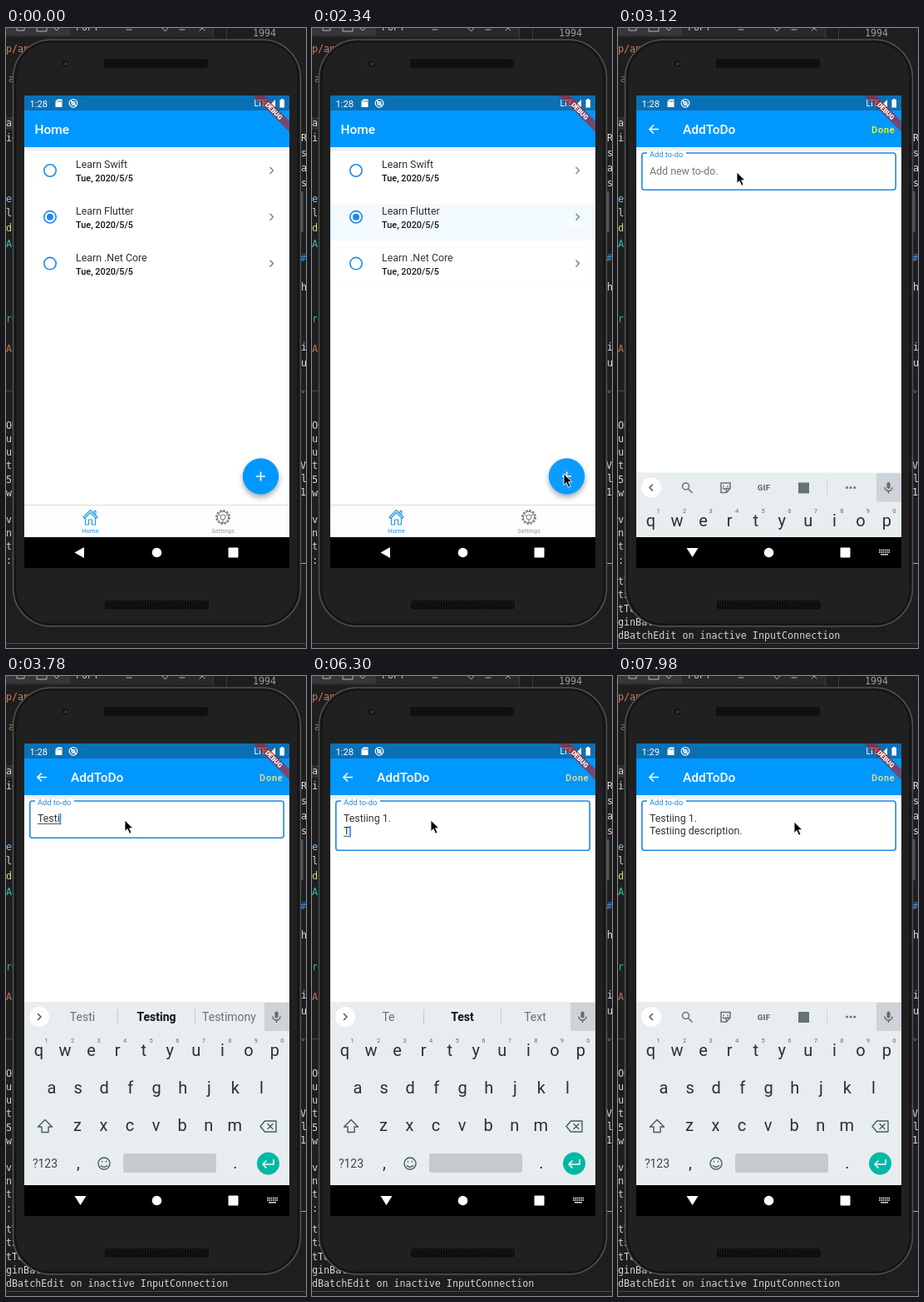
Write an HTML page that moves like this. It is 361 px wide and 744 px high and loops after 8 s.

```html
<!DOCTYPE html>
<html lang="en">
<head>
<meta charset="utf-8">
<title>To-do app</title>
<style>
  html, body { margin: 0; width: 100%; height: 100%; overflow: hidden; background: #1e1e1e; }
  svg { display: block; width: 361px; height: 744px; font-family: Roboto, sans-serif; }
  .mono { font: 11.7px "DejaVu Sans Mono", monospace; white-space: pre; }
  .mid { text-anchor: middle; }
  .line { fill: none; stroke-linecap: round; stroke-linejoin: round; }
  .title { font-size: 15.5px; font-weight: 500; fill: #fff; }
  .body { font-size: 12.4px; fill: #303030; }
  .keys { font-size: 20px; fill: #263238; }
  #cursor, #page, #keyboard, #label, #hint, #gap, #frame { animation: 8s linear infinite; }
  #cursor { animation-name: point; }
  #page { animation-name: enter; }
  #keyboard { animation-name: rise; }
  #label { animation-name: float; }
  #hint, #gap { animation-name: reveal; }
  #frame { animation-name: focus; }

  @keyframes point {
    0%, 2.2% { transform: translate(185px, 750px); }
    9% { transform: translate(184px, 600px); }
    12% { transform: translate(184px, 590px); }
    16.2% { transform: translate(180px, 310px); }
    18.6%, 22.2% { transform: translate(157px, 210px); animation-timing-function: ease-in-out; }
    26.5%, 29.5% { transform: translate(303px, 535px); animation-timing-function: ease-in; }
    33.5% { transform: translate(150px, 240px); animation-timing-function: ease-out; }
    35.2%, 96.6% { transform: translate(143px, 173px); animation-timing-function: ease-in-out; }
    99.5%, 100% { transform: translate(212px, 175px); }
  }
  @keyframes enter {
    0%, 29.2% { opacity: 0; transform: translateY(118px); animation-timing-function: ease-out; }
    31.4%, 100% { opacity: 1; transform: none; }
  }
  @keyframes rise {
    0%, 38.4% { transform: translateY(222px); animation-timing-function: ease-out; }
    41%, 100% { transform: none; }
  }
  @keyframes float {
    0%, 35.6% { transform: translate(38px, 176px) scale(1.33); fill: #777; animation-timing-function: ease-out; }
    37%, 100% { transform: translate(38px, 154.6px); fill: #1e88e5; }
  }
  @keyframes reveal { 0%, 35.8% { opacity: 0; } 37%, 100% { opacity: 1; } }
  @keyframes focus {
    0%, 35.6% { stroke: #999; stroke-width: .8px; }
    37%, 100% { stroke: #1e88e5; stroke-width: 1.6px; }
  }
</style>
</head>
<body>
<svg viewBox="0 0 361 744">
  <defs>
    <clipPath id="screen"><path d="M22 81H341V648H22z"/></clipPath>
    <clipPath id="content"><path d="M22 99H341V572H22z"/></clipPath>
    <clipPath id="app"><path d="M22 99H341V611H22z"/></clipPath>
    <pattern id="mesh" width="3" height="3" patternUnits="userSpaceOnUse">
      <path d="M0 0H3V3H0z" fill="#0b0b0b"/><circle cx="1.5" cy="1.5" r=".8" fill="#242424"/>
    </pattern>
    <filter id="shadow" x="-40%" y="-40%" width="180%" height="190%">
      <feDropShadow dx="0" dy="3.5" stdDeviation="3" flood-opacity=".35"/>
    </filter>
  </defs>

  <path d="M0 0H361V744H0z" fill="#1e1e1e"/>
  <path d="M0 0H249V11H0z" fill="#29292b"/>
  <path d="M0 0H77V9H0z" fill="#37373a"/>
  <path d="M249.5 0V14M265.5 0V14" stroke="#3a3a3a"/>
  <g class="line" stroke="#b5b5b5">
    <path d="M13 0V3H22V0M37 0V4H49V0M58 0L61 3L64 0M145 2H151M188 0L191.500 4L195 0M209 2H215M233 3L236 0L239 3"/>
  </g>
  <path d="M0 107H9V122H0z" fill="#303030"/>
  <path d="M0 435.500H361M0 738.500H361" stroke="#484848"/>
  <path d="M354 642.500H361" stroke="#aaa"/>
  <g id="editor" class="mono"></g>
  <g id="log" class="mono" fill="#d4d4d4"></g>

  <!-- phone body -->
  <path d="M354 196H357.500V245H354z" fill="#555"/>
  <rect x="8.500" y="14" width="346" height="704" rx="46" fill="#1c1c1c" stroke="#525252" stroke-width="1.500"/>
  <rect x="11.500" y="16.500" width="340" height="699" rx="43" fill="#202020" stroke="#121212" stroke-width="1.500"/>
  <rect x="118" y="37" width="125" height="11" rx="3" fill="url(#mesh)"/>
  <rect x="119" y="687" width="125" height="10.500" rx="3" fill="url(#mesh)"/>
  <circle cx="71.500" cy="43" r="5" fill="#151515" stroke="#2b2b2b"/>
  <circle cx="72" cy="43" r="2" fill="#33343a"/>

  <g clip-path="url(#screen)">
    <path d="M22 81H341V648H22z" fill="#fff"/>

    <!-- list page -->
    <path d="M22 143H341V147H22z" fill="#000" opacity=".07"/>
    <path d="M22 99H341V143H22z" fill="#0098ff"/>
    <text class="title" x="34.500" y="127">Home</text>
    <g id="list"></g>
    <circle cx="306.500" cy="538" r="21.700" fill="#0098ff" filter="url(#shadow)"/>
    <path d="M301 538H312M306.500 532.500V543.500" stroke="#fff" stroke-width="1.600"/>

    <!-- entry page -->
    <g clip-path="url(#content)">
      <g id="page">
        <path d="M22 99H341V572H22z" fill="#fff"/>
        <path d="M22 143H341V147H22z" fill="#000" opacity=".07"/>
        <path d="M22 99H341V143H22z" fill="#0098ff"/>
        <path d="M49 121.500H38M43 116.500L38 121.500L43 126.500" fill="none" stroke="#fff" stroke-width="1.600"/>
        <text class="title" x="78" y="127">AddToDo</text>
        <text id="done" x="305" y="125.500" font-size="10.900" font-weight="500" letter-spacing=".8">Done</text>
        <rect id="frame" x="28.800" y="150" width="305.400" height="44.300" rx="3" fill="none"/>
        <path id="gap" d="M35 148H82V152H35z" fill="#fff"/>
        <text id="label" font-size="9.300">Add to-do</text>
        <g id="hint"><text class="body" x="38" y="175.500" style="fill:#777">Add new to-do.</text></g>
        <text id="line0" class="body" x="38" y="175.300"></text>
        <text id="line1" class="body" x="38" y="190.300"></text>
        <path id="underline" stroke="#303030" stroke-width=".9"/>
        <path id="caret" stroke="#1e88e5" stroke-width="1.600"/>
      </g>
    </g>

    <!-- tabs -->
    <path d="M22 572H341V611H22z" fill="#fdfdfd"/>
    <path d="M22 572.500H341" stroke="#ddd"/>
    <g class="line" stroke="#1e96f0" stroke-width="1.100">
      <path d="M93 587L101.500 578.500L110 587L108.500 588.500L101.500 581.500L94.500 588.500zM95.500 588V596H99.500V590H103.500V596H107.500V588M106 583V579.500H108V585"/>
    </g>
    <g fill="none" stroke="#777">
      <circle cx="261" cy="587" r="8" stroke-width="1.800" stroke-dasharray="2.500 1.689"/>
      <circle cx="261" cy="587" r="6.700"/>
      <circle cx="261" cy="587" r="3"/>
      <path d="M261 590V593.500M258.500 585.500L255.500 583.500M263.500 585.500L266.500 583.500"/>
    </g>
    <text class="mid" x="101.500" y="605.700" font-size="7.600" fill="#1e96f0">Home</text>
    <text class="mid" x="261" y="605.700" font-size="7.600" fill="#999">Settings</text>

    <g clip-path="url(#app)">
      <g id="keyboard">
        <path d="M22 391H341V611H22z" fill="#e8edef"/>
        <path d="M311 392H341V426H311z" fill="#cdd3d6"/>
        <circle cx="40" cy="409" r="12" fill="#fff"/>
        <path id="toggle" class="line" stroke="#455a64" stroke-width="1.500"/>
        <g fill="none" stroke="#5f6b72" stroke-width="1.500">
          <rect x="323.500" y="402.500" width="4" height="8" rx="2" fill="#5f6b72" stroke="none"/>
          <path d="M321 408.500A4.500 4.500 0 0 0 330 408.500M325.500 413V416"/>
        </g>
        <g id="tools" fill="none" stroke="#66727a" stroke-width="1.500">
          <circle cx="81.500" cy="407.500" r="4"/><path d="M84.500 410.500L89.500 415.500"/>
          <path d="M124 403.500H135V410L130.500 415H124zM130.500 415V410H135M126 409Q128 412 130 410M127 406.500V408M132 406.500V408"/>
          <text class="mid" x="175.500" y="412.500" font-size="9.500" font-weight="900" letter-spacing=".4" fill="#66727a" stroke="none">GIF</text>
          <path d="M217 403H230V416H217z" fill="#66727a" stroke="none"/>
          <path d="M251.500 400V418" stroke="#cfd5d8" stroke-width="1"/>
          <path d="M275.500 409H285" stroke-width="3" stroke-linecap="round" stroke-dasharray="0 4.600"/>
        </g>
        <g id="words" class="mid" font-size="14">
          <path d="M134.500 400V418M227.500 400V418" stroke="#c3c9cc"/>
          <text x="92" y="414"></text><text x="181" y="414"></text><text x="268.500" y="414"></text>
        </g>
        <g id="keys" class="keys mid"></g>
        <g class="line" stroke="#455a64" stroke-width="1.400">
          <path d="M47 532.500L55.500 541H51V547.500H43V541H38.500z"/>
          <path d="M306 540.500L311.500 534H325V547H311.500zM315 537.500L321 543.500M321 537.500L315 543.500"/>
          <circle cx="118" cy="585" r="7"/><path d="M114.500 587.500Q118 591 121.500 587.500M115.500 582.500V583M120.500 582.500V583"/>
        </g>
        <text class="mid" x="47" y="590" font-size="14" fill="#37474f">?123</text>
        <text class="keys mid" x="87" y="591">,</text>
        <text class="keys mid" x="276" y="591">.</text>
        <rect x="141" y="573" width="112" height="23" rx="3" fill="#c5cacd"/>
        <circle cx="315.500" cy="585" r="13.500" fill="#00b8a5"/>
        <path class="line" d="M322 580.500V586H309.500M313 582L309 586L313 590" stroke="#fff" stroke-width="1.600"/>
      </g>
    </g>

    <!-- system bars -->
    <path d="M22 611H341V648H22z"/>
    <path id="back" fill="#fff"/>
    <circle cx="181.500" cy="629.500" r="5.800" fill="#fff"/>
    <rect x="267.500" y="623.500" width="12" height="12" rx="1" fill="#fff"/>
    <g id="imeIcon" stroke="#fff" fill="none">
      <path d="M314 626.500H327M314 629H327" stroke-width="1.500" stroke-dasharray="1.500 .800"/>
      <path d="M316 631.800H325" stroke-width="1.300"/>
    </g>
    <path d="M22 81H341V99H22z" fill="#0a70b4"/>
    <text id="clock" x="28.500" y="94.500" font-size="11.200" fill="#fff"></text>
    <path d="M62 85.500H67.500V95H59.500V88z" fill="#fff"/>
    <path d="M62.500 87V89M64.500 87V89M66.200 87V89" stroke="#0a70b4" stroke-width=".8"/>
    <g fill="none" stroke="#fff" stroke-width="1.200">
      <circle cx="81" cy="90.300" r="4.800"/><circle cx="81" cy="90.300" r="2"/><path d="M78 87L84 93.500"/>
    </g>
    <text x="298.500" y="94" font-size="10" fill="#fff">LTE</text>
    <path d="M324 86V95H315zM329.500 86H331V85H333.500V86H335V95.500H329.500z" fill="#fff"/>
    <g transform="translate(341 81) rotate(45)">
      <path d="M-32 21.700H32V31H-32z" fill="#b71c1c" fill-opacity=".63"/>
      <text class="mid" y="29.200" font-size="7.900" font-weight="900" fill="#fff">DEBUG</text>
    </g>
  </g>

  <g id="cursor">
    <path d="M0 0V13.500L3.200 10.600L5.600 16.200L8 15.200L5.600 9.700H10z" stroke="#fff" stroke-width=".9"/>
  </g>
</svg>
<script>
const LOOP = 8000;
const $ = id => document.getElementById(id);
const add = (id, html) => $(id).insertAdjacentHTML('beforeend', html);
const show = (id, on) => { $(id).style.display = on ? '' : 'none'; };

const codeBits = [
  [0, 29, 'p/an', '#ce7b5c'], [3, 65, 'a', '#6a9955'], [0, 118, 'al', '#d4d4d4'], [0, 136, 'id', '#d4d4d4'],
  [0, 209, 'et', '#7cc4ee'], [0, 226, 'lS', '#d4d4d4'], [0, 244, 'do', '#dcdc8a'], [0, 263, 'Ap', '#35c4a5'],
  [0, 353, 're', '#35b79b'], [0, 389, 'Ap', '#d0694d'],
  [355, 136, 'Ru', '#ddd'], [355, 154, 'sh', '#ddd'], [355, 172, 'ap', '#ddd'], [355, 190, 'se', '#ddd'],
  [354, 280, '#', '#3794ff'], [355, 315, 'h', '#ddd'], [355, 387, 'in', '#ddd'], [355, 406, 'us', '#ddd'],
  [354, 438, '..', '#3794ff'], [354, 529, 'V', '#ddd'], [355, 545, 'l', '#ddd'], [354, 561, '1', '#ddd'],
  [297, 10, '1994', '#9a9a9a'], [84, 3, 'POPT', '#bbb']
];
codeBits.forEach(([x, y, s, color]) => add('editor', `<text x="${x}" y="${y}" fill="${color}">${s}</text>`));
'OK up ut ti 51 wC  va nt t. :y'.split(' ').forEach((s, i) =>
  add('editor', `<text x="0" y="${481 + i * 16.15}" fill="#d4d4d4">${s}</text>`));
['tT', 'tS', 'tTe', 'ginBat', 'dBatchEdit on inactive InputConnection'].forEach((s, i) =>
  add('log', `<text x="0" y="${668 + i * 16.25}">${s}</text>`));

['Learn Swift', 'Learn Flutter', 'Learn .Net Core'].forEach((name, i) => {
  const y = 171 + i * 55.8;
  add('list', `<circle cx="53" cy="${y}" r="7.200" fill="none" stroke="#1e88f0" stroke-width="1.600"/>
    ${i === 1 ? `<circle cx="53" cy="${y}" r="4" fill="#1e88f0"/>` : ''}
    <text class="body" x="84" y="${y - 3}">${name}</text>
    <text x="84" y="${y + 13}" font-size="10.900" font-weight="500" fill="#111">Tue, 2020/5/5</text>
    <path d="M317.500 ${y - 4}l4 4l-4 4" fill="none" stroke="#888" stroke-width="1.500"/>`);
});

[['qwertyuiop', 39.5, 456], ['asdfghjkl', 55, 501], ['zxcvbnm', 86, 546]].forEach(([row, x0, y], r) =>
  [...row].forEach((key, i) => {
    const x = x0 + i * 31.55;
    add('keys', `<text x="${x}" y="${y}">${key}</text>`);
    if (r === 0) add('keys', `<text x="${x + 9}" y="440" font-size="7.500" fill="#607078">${(i + 1) % 10}</text>`);
  }));

// Typing bursts: start, ms per key, characters
const bursts = [
  [3480, 72, 'Testi'], [4000, 100, 'ing '], [4560, 240, '1.'], [5700, 0, '\n'],
  [6240, 90, 'Testiing '], [7140, 49, 'description.']
];
// Suggestion strip: an empty string shows the tools
const strips = [
  [0, ''], [3480, 'Te|Test|Text'], [3720, 'Testi|Testing|Testimony'], [4300, 'and|1|is'], [4560, ''],
  [6240, 'Te|Test|Text'], [6520, 'Testi|Testing|Testimony'], [6960, 'and|1|is'],
  [7140, 'des|description|desk'], [7679, '']
];

function typedAt(t) {
  let text = '', lastKey = 2850;
  for (const [start, step, chars] of bursts) {
    if (t < start) break;
    const count = step ? Math.min(chars.length, Math.floor((t - start) / step) + 1) : 1;
    text += chars.slice(0, count);
    lastKey = start + (count - 1) * step;
  }
  return { text, lastKey };
}

function drawField(t) {
  const { text, lastKey } = typedAt(t);
  const lines = text.split('\n');
  const row = lines.length - 1;
  [0, 1].forEach(i => { $('line' + i).textContent = (lines[i] || '').replaceAll(' ', '\u00a0'); });
  $('frame').setAttribute('height', 44.3 + row * 15);
  show('hint', !text);

  const node = $('line' + row), length = lines[row].length;
  const end = 38 + (length ? node.getComputedTextLength() : 0);
  const y = 165 + row * 15;
  $('caret').setAttribute('d', `M${end + .6} ${y}v13.500`);
  show('caret', t >= 2850 && (t - lastKey) % 500 < 250);

  const word = /[a-z]+$/i.exec(lines[row]);
  const begin = word && word.index ? 38 + node.getSubStringLength(0, word.index) : 38;
  $('underline').setAttribute('d', word ? `M${begin} ${y + 12.3}H${end}` : '');
}

function drawStrip(t) {
  const strip = strips.findLast(([start]) => t >= start)[1];
  show('tools', !strip);
  show('words', strip);
  $('toggle').setAttribute('d', strip ? 'M38.500 405.500l3.500 3.500l-3.500 3.500' : 'M41.500 405.500l-3.500 3.500l3.500 3.500');
  const words = strip.split('|');
  const composing = strip && words[0] !== 'and';
  $('words').querySelectorAll('text').forEach((node, i) => {
    const best = composing && i === 1;
    node.textContent = words[i] || '';
    node.setAttribute('fill', best ? '#111' : '#66727a');
    node.setAttribute('font-weight', best ? 700 : 400);
  });
}

function draw(t) {
  const ime = t >= 2860;
  drawField(t);
  drawStrip(t);
  $('clock').textContent = t < 7560 ? '1:28' : '1:29';
  $('done').setAttribute('fill', t < 3200 ? '#f4ff1a' : '#f3e487');
  $('back').setAttribute('d', ime ? 'M82.500 624H96.500L89.500 635z' : 'M94 623V636L82.500 629.500z');
  show('imeIcon', ime);
  [...$('log').children].forEach((line, i) => {
    line.style.display = t >= (i < 4 ? 2500 : 2640) ? '' : 'none';
  });
}

const start = performance.now();
function tick() {
  draw((performance.now() - start) % LOOP);
  requestAnimationFrame(tick);
}
tick();
</script>
</body>
</html>
```
